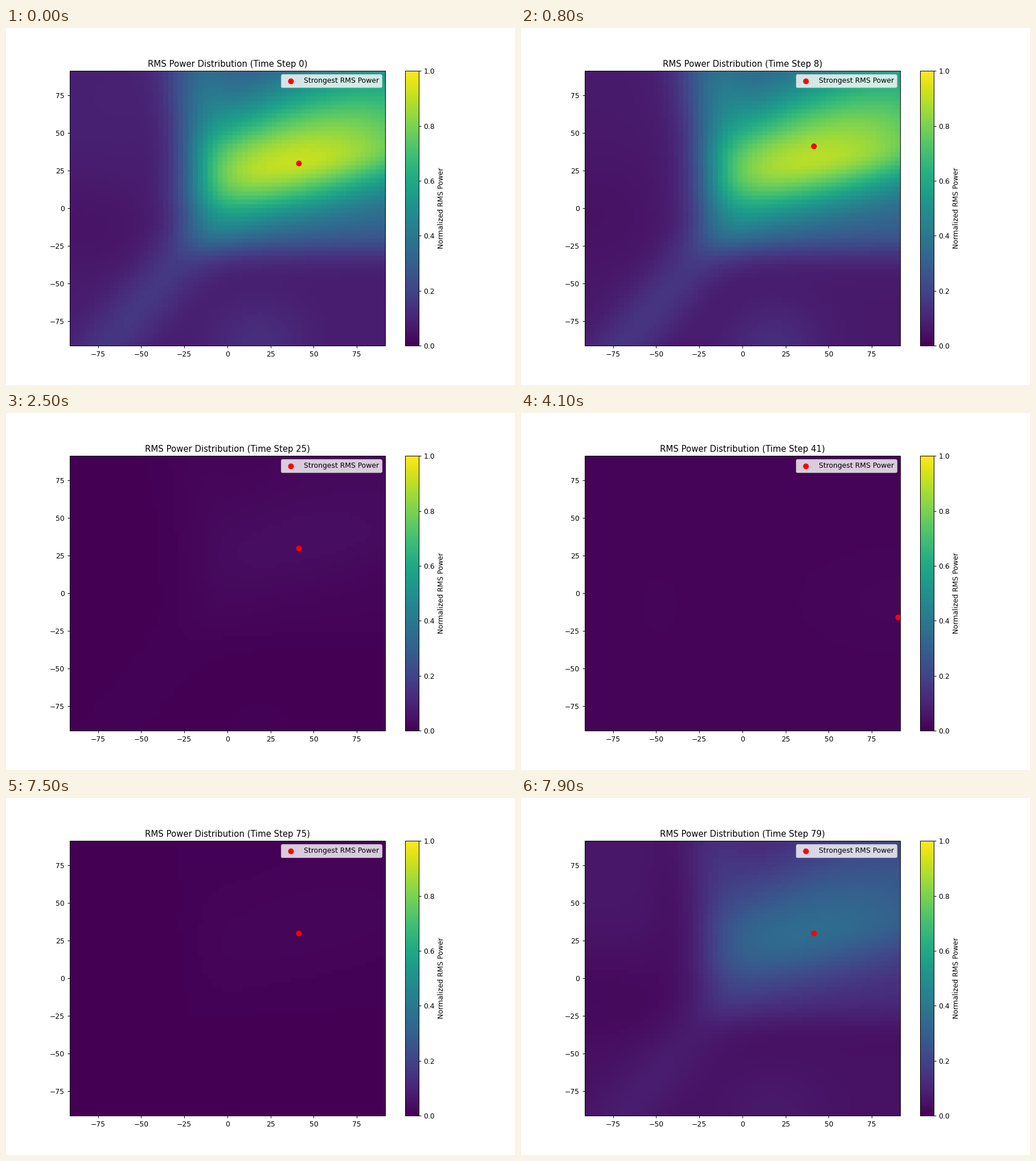
A matplotlib script that plays this animation: 894x626 px, repeating every 8000 ms.

```python
import numpy as np
import matplotlib.pyplot as plt
from matplotlib.animation import FuncAnimation

STEPS = 80
axis = np.linspace(-90, 90, 64)
X, Y = np.meshgrid(axis, axis)


def rise(u):
    return 1 / (1 + np.exp(-u))


def lobe(cx, cy, wx, wy):
    return np.exp(-((X - cx) / wx) ** 2 - ((Y - cy) / wy) ** 2)


def main_field():
    # A slanted ridge on a plateau, both cut off by a soft left shore.
    shore = rise((X + 20 + 0.2 * np.maximum(Y - 25, 0)) / 8)
    plateau = 0.27 * rise((Y + 27) / 6)
    height = 0.66 - 0.12 * ((X - 42) / 48) ** 2
    offset = Y - (25 + 0.2 * X)
    spread = np.where(offset > 0, 26 + 0.22 * X, 23 - 0.03 * X)
    ridge = height * np.exp(-0.5 * (offset / spread) ** 2)

    # A faint diagonal arm towards the lower left.
    across = (1.4 * (X + 28) - (Y + 34)) / 1.72
    arm = 0.1 * np.exp(-(across / 18) ** 2) * rise(-(Y + 8) / 6)

    base = 0.07 - 0.02 * lobe(-85, 0, 50, 45)
    column = 0.13 * lobe(-14, 75, 18, 32)
    floor = 0.07 * lobe(18, -91, 28, 28)
    return base + shore * (plateau + ridge) + arm + column + floor


MAIN = main_field()
ECHO = 0.009 + 0.008 * lobe(95, -5, 60, 35) + 0.004 * lobe(-48, -8, 16, 28)
HAZE = (rise(-(X + 48) / 6) * rise((Y - 15) / 12)
        + 0.6 * rise(-(Y + 40) / 10))


def power(step):
    phase = (step + 6) % STEPS - 6
    if phase < 0:
        level = 0.37 * ((phase + 6) / 5) ** 2
    else:
        level = np.cos(np.pi / 2 * min(1, abs(phase - 3) / 25)) ** 2
    tilt = np.interp(phase, [0, 4, 11], [0.15, 0, 0.06])
    haze = np.interp(phase, [-5, -1, 4, 11, 25], [0, 0.04, 0, 0.012, 0])
    echo = max(0, 1 - abs(step - 41) / 5)
    main = level * MAIN * (1 - tilt * np.abs(Y - 5) / 80)
    return main + haze * HAZE + echo * ECHO


# First step of each stay of the strongest cell, with its column and row.
STAYS = [
    (0, 46, 42), (2, 46, 46), (10, 42, 42), (25, 46, 42), (31, 63, 30),
    (39, 63, 26), (47, 28, 42), (54, 46, 46), (62, 21, 0), (64, 46, 46),
    (73, 46, 42),
]


def strongest(step):
    _, col, row = [stay for stay in STAYS if stay[0] <= step][-1]
    return axis[col], axis[row]


fig, ax = plt.subplots(figsize=(10, 7.0023), dpi=89.4)  # 894 x 626 px
mesh = ax.pcolormesh(X, Y, power(0), cmap="viridis", vmin=0, vmax=1,
                     shading="nearest")
fig.colorbar(mesh, ax=ax, label="Normalized RMS Power")
edge = 90 + 90 / 63
ax.set(xlim=(-edge, edge), ylim=(-edge, edge))
marker = ax.scatter(*strongest(0), color="red", s=50,
                    label="Strongest RMS Power")
ax.legend(loc="upper right")
title = ax.set_title("RMS Power Distribution (Time Step 0)")


def update(step):
    mesh.set_array(power(step))
    marker.set_offsets([strongest(step)])
    title.set_text(f"RMS Power Distribution (Time Step {step})")
    return mesh, marker, title


anim = FuncAnimation(fig, update, frames=STEPS, interval=100, repeat=True,
                     repeat_delay=0, blit=False)
plt.show()
```
